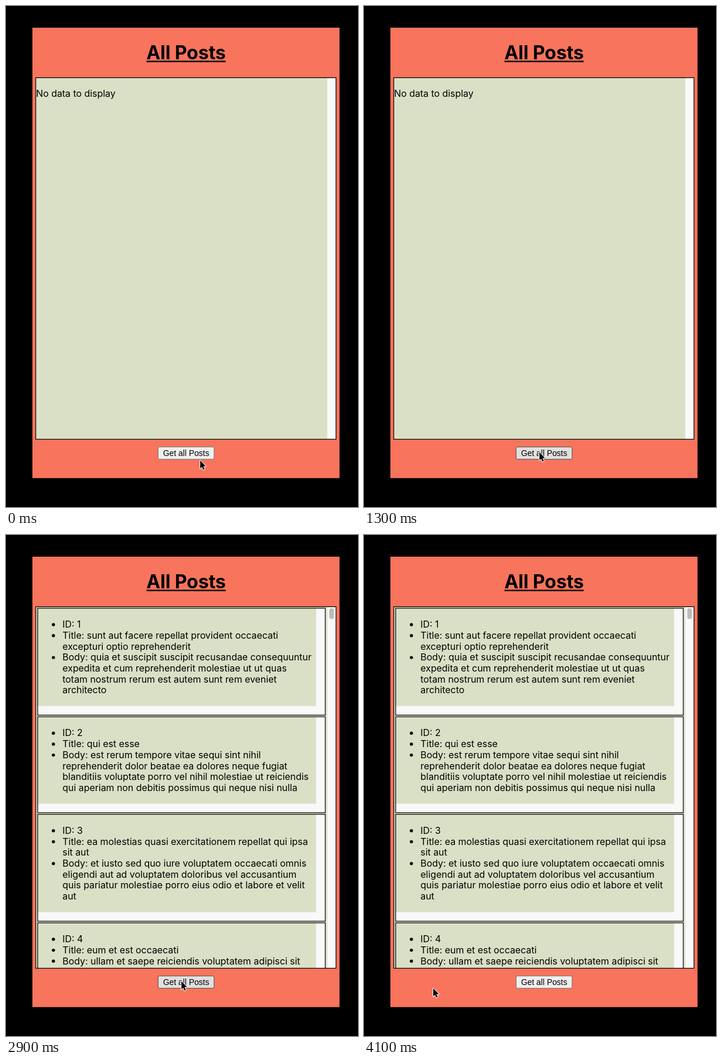
An HTML page that plays this animation: 600x855 px, repeating every 4.4 s.

```html
<!DOCTYPE html>
<html lang="en">
<head>
<meta charset="utf-8">
<title>All Posts</title>
<style>
  html, body { margin: 0; width: 100%; height: 100%; overflow: hidden; background: #000; }
  svg { display: block; width: 600px; height: 855px; font: 15.9px Inter, sans-serif; }
  .title { font-size: 32px; font-weight: 700; letter-spacing: -.1px; }
  .label { font: 13.9px "Liberation Sans", Arial, sans-serif; }
  .green { fill: #dae0c5; }
  .track { fill: #f9f9f9; }
  .edge { fill: #e7e7e5; }
  .line { fill: none; stroke: #000; stroke-width: 1.2; }

  #empty, #posts, #button, #cursor { animation: 4.4s step-end infinite; }
  #empty { animation-name: hide; }
  #posts { animation-name: show; }
  #button { animation-name: hover; }
  #cursor { animation-name: move; }

  @keyframes hide { 0% { visibility: visible; } 50%, 100% { visibility: hidden; } }
  @keyframes show { 0% { visibility: hidden; } 50%, 100% { visibility: visible; } }
  @keyframes hover {
    0%, 75%, 100% { fill: #efefef; stroke: #767676; }
    2.272% { fill: #e0e0e0; stroke: #505050; }
  }
  /* The pointer advances ten times a second */
  @keyframes move {
    0% { transform: translate(330px, 774px); animation-timing-function: steps(6); }
    13.636% { transform: translate(298px, 760px); }
    72.727% { transform: translate(298px, 760px); animation-timing-function: steps(2); }
    77.272% { transform: translate(166px, 775px); animation-timing-function: steps(4); }
    86.363%, 100% { transform: translate(117px, 772px); }
  }
</style>
</head>
<body>
<svg viewBox="0 0 600 855">
  <defs><clipPath id="view"><rect x="51" y="122.5" width="511.5" height="617"/></clipPath></defs>

  <rect x="45" y="37" width="523.5" height="768.7" fill="#f8745c"/>
  <text class="title" x="307" y="91" text-anchor="middle">All Posts</text>
  <rect x="239.5" y="93.4" width="135" height="2.4"/>

  <rect class="green" x="50.7" y="122.4" width="511.8" height="617"/>
  <rect class="track" x="547" y="122.4" width="15.5" height="617"/>
  <rect class="edge" x="547" y="122.4" width="1" height="617"/>

  <text id="empty" x="51.2" y="154.8">No data to display</text>
  <g id="posts" clip-path="url(#view)">
    <g id="cards"></g>
    <rect x="551" y="125" width="8" height="18.5" rx="4" fill="#bcbcba"/>
  </g>
  <rect class="line" x="50.7" y="122.4" width="511.8" height="617"/>

  <rect id="button" x="259.3" y="752.6" width="95.4" height="20.8" rx="2.5"/>
  <text class="label" x="307" y="767.6" text-anchor="middle">Get all Posts</text>

  <path id="cursor" d="M1 1.6V15.2L4 12.4L6.2 17.6L8.5 16.6L6.3 11.5H10.6Z"
        stroke="#fff" stroke-width="1.9" stroke-linejoin="round" paint-order="stroke"/>
</svg>
<script>
  // Each post is a list of items; "|" marks a line break
  const posts = [
    ["ID: 1",
     "Title: sunt aut facere repellat provident occaecati|excepturi optio reprehenderit",
     "Body: quia et suscipit suscipit recusandae consequuntur|expedita et cum reprehenderit molestiae ut ut quas|totam nostrum rerum est autem sunt rem eveniet|architecto"],
    ["ID: 2",
     "Title: qui est esse",
     "Body: est rerum tempore vitae sequi sint nihil|reprehenderit dolor beatae ea dolores neque fugiat|blanditiis voluptate porro vel nihil molestiae ut reiciendis|qui aperiam non debitis possimus qui neque nisi nulla"],
    ["ID: 3",
     "Title: ea molestias quasi exercitationem repellat qui ipsa|sit aut",
     "Body: et iusto sed quo iure voluptatem occaecati omnis|eligendi aut ad voluptatem doloribus vel accusantium|quis pariatur molestiae porro eius odio et labore et velit|aut"],
    ["ID: 4",
     "Title: eum et est occaecati",
     "Body: ullam et saepe reiciendis voluptatem adipisci sit"]
  ];
  const LEFT = 54, WIDTH = 490.2, GREEN = 474, STEP = 18.7;

  const rect = (cls, x, y, w, h) =>
    `<rect class="${cls}" x="${x}" y="${y}" width="${w}" height="${h}"/>`;

  // Returns the markup of one card and the height it takes up
  function drawCard(items, cardY) {
    let y = cardY + 33.2, count = 0, text = "";
    for (const item of items) {
      text += `<circle cx="80.8" cy="${y - 5.2}" r="2.7"/>`;
      for (const line of item.split("|")) {
        text += `<text x="96.3" y="${y}">${line}</text>`;
        y += STEP;
        count++;
      }
    }
    const height = count * STEP + 51.5, inner = height - 16;
    const markup = rect("track", LEFT, cardY, WIDTH, height)
      + rect("edge", LEFT, cardY, GREEN + 1, inner + 1)
      + rect("green", LEFT, cardY, GREEN, inner)
      + rect("line", LEFT, cardY, WIDTH, height) + text;
    return { markup, height };
  }

  let nextY = 125, cardsMarkup = "";
  for (const items of posts) {
    const card = drawCard(items, nextY);
    cardsMarkup += card.markup;
    nextY += card.height + 2.8;
  }
  document.getElementById("cards").innerHTML = cardsMarkup;
</script>
</body>
</html>
```
